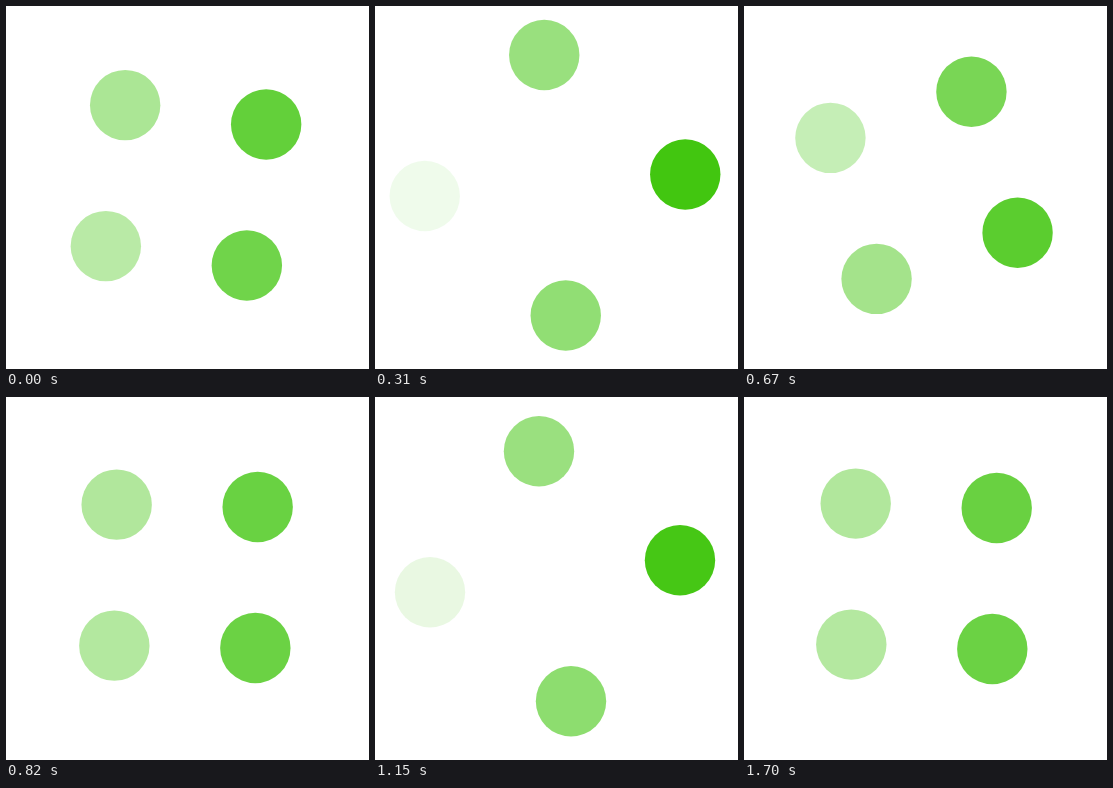
These frames come from a looping animation (363x363 px, 1800 ms). An HTML page:

```html
<!DOCTYPE html>
<html lang="en">
<head>
<meta charset="utf-8">
<title>Four dots loader</title>
<style>
  html, body { margin: 0; width: 100%; height: 100%; overflow: hidden; background: #fff; }
  svg { display: block; width: 100%; height: 100%; }
  circle { fill: #3cc408; }
</style>
</head>
<body>
<svg viewBox="0 0 363 363">
  <circle r="35.2"/>
  <circle r="35.2"/>
  <circle r="35.2"/>
  <circle r="35.2"/>
</svg>
<script>
  const LOOP = 1800, MOVE = 1700;   // the last pose is held until the loop ends
  const CX = 180, CY = 179.3;
  const REACH = 141;                // from the centre to a corner of the diamond
  const OFFSET = 80 / REACH;        // start, in sides after the left corner
  const SPEED = 274.7 / REACH / MOVE;
  const MID = .525;                 // opacity at the top and bottom corners
  const dots = document.querySelectorAll('circle');

  // Eases out from clear on the left to MID, then rises evenly to solid on the right.
  function opacity(x) {
    return x < 0 ? MID * (1 - x * x) : MID + (1 - MID) * x;
  }

  // A side count of 0 is the left corner, 1 the top, 2 the right, 3 the bottom.
  function place(dot, sides) {
    const s = sides % 4;
    const x = 1 - Math.abs(s - 2);
    const y = (1 - Math.abs(x)) * (s < 2 ? -1 : 1);
    dot.setAttribute('cx', CX + REACH * x);
    dot.setAttribute('cy', CY + REACH * y);
    dot.setAttribute('opacity', opacity(x));
  }

  function draw(time) {
    const sides = OFFSET + SPEED * Math.min(time % LOOP, MOVE);
    dots.forEach((dot, i) => place(dot, sides + i));
  }

  const start = performance.now();
  function tick() {
    draw(performance.now() - start);
    requestAnimationFrame(tick);
  }
  tick();
</script>
</body>
</html>
```
